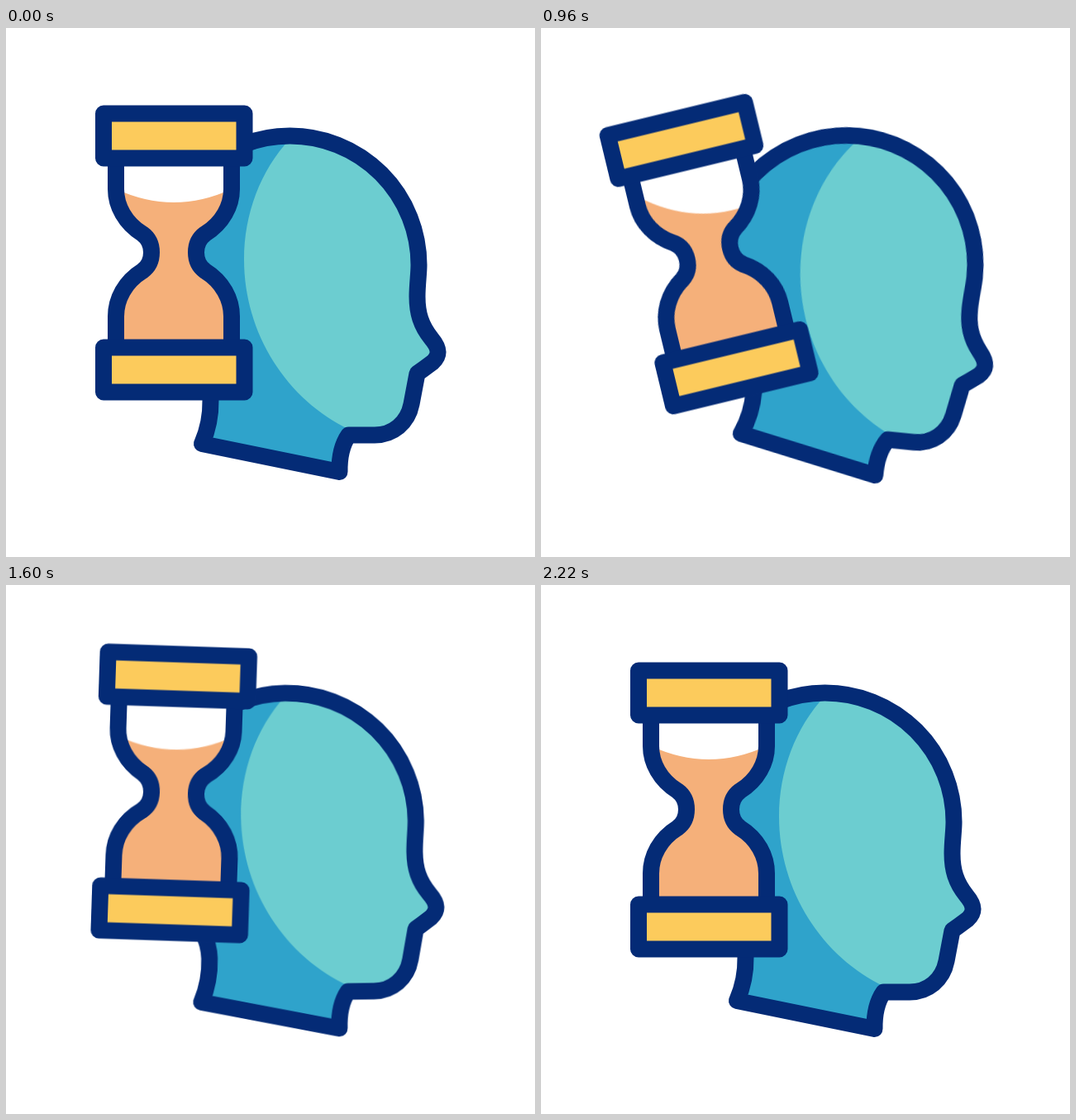
Recreate the animation shown at these times as an HTML page without scripts. Size 640 px wide and 640 px high, loop 2400 ms.

```html
<!DOCTYPE html>
<html lang="en">
<head>
<meta charset="utf-8">
<title>Head and hourglass</title>
<style>
  html, body { margin: 0; width: 100%; height: 100%; overflow: hidden; background: #fff; }
  svg { display: block; width: 100%; height: 100%; }

  .line { stroke: #042b76; stroke-width: 20; stroke-linejoin: round; }

  .nod, .lift, .tilt, .level {
    animation: 2400ms cubic-bezier(.3333, 0, .6667, 1) infinite;
  }
  .nod   { animation-name: nod;   transform-origin: 362px 546px; }
  .lift  { animation-name: lift; }
  .tilt  { animation-name: tilt;  transform-origin: 203px 272px; }
  .level { animation-name: level; transform-origin: 203px 211px; }

  @keyframes nod {
    0%, 8.333%    { transform: rotate(0deg); }
    33.333%       { transform: rotate(8.5deg); }
    58.333%       { transform: rotate(-7.2deg); }
    75%           { transform: rotate(5.5deg); }
    91.667%, 100% { transform: rotate(0deg); }
  }
  @keyframes lift {
    0%, 8.333%    { transform: translateY(0); }
    29.167%       { transform: translateY(-25px); }
    50%           { transform: translateY(25px); }
    70.833%       { transform: translateY(-25px); }
    91.667%, 100% { transform: translateY(0); }
  }
  @keyframes tilt {
    0%, 8.333%    { transform: rotate(0deg); }
    33.333%       { transform: rotate(-20deg); }
    58.333%       { transform: rotate(16deg); }
    75%           { transform: rotate(-12deg); }
    91.667%, 100% { transform: rotate(0deg); }
  }
  /* Cancels the tilt so the sand surface stays level. */
  @keyframes level {
    0%, 8.333%    { transform: translate(0, 0) rotate(0deg); }
    33.333%       { transform: translate(6px, 13px) rotate(20deg); }
    58.333%       { transform: translate(-3px, 5px) rotate(-16deg); }
    75%           { transform: translate(6px, 11px) rotate(12deg); }
    91.667%, 100% { transform: translate(0, 0) rotate(0deg); }
  }
</style>
</head>
<body>
<svg viewBox="0 0 640 640">
  <defs>
    <path id="head" d="M237 503Q248 478 247.5 450C247 400 187.5 350 187.5 286.5A156 156 0 0 1 499.5 286.5
      C499.5 298 497.5 310 497.5 325C497.5 345 502 360 514.5 375.5C525 388 525 396 516 404.5Q506 412 497.5 418
      L490.5 455C486 478 468 492.5 446 492.5H414.5Q403 509 403.5 537Z"/>
    <path id="glass" d="M133 157V195C133 215 144 236 165 249C172 254 176 262 176 271.5
      S172 289 165 294C144 307 133 328 133 349V387H273V349C273 328 262 307 241 294
      C234 289 230 281 230 271.5S234 254 241 249C262 236 273 215 273 195V157Z"/>
    <rect id="cap" x="118" width="170.5" height="54"/>
    <clipPath id="in-head"><use href="#head"/></clipPath>
    <clipPath id="in-glass"><use href="#glass"/></clipPath>
  </defs>

  <g class="nod">
    <use href="#head" fill="#2fa3cb"/>
    <path clip-path="url(#in-head)" fill="#6ccdd0"
      d="M343 135C308 172 288 225 288 280C288 370 340 450 416 486V560H560V100H343Z"/>
    <use href="#head" class="line" fill="none"/>
  </g>

  <g class="lift">
    <g class="tilt">
      <use href="#glass" fill="#fff"/>
      <g clip-path="url(#in-glass)">
        <path class="level" fill="#f5b07a" d="M63 146Q203 276 343 146V450H63Z"/>
      </g>
      <use href="#glass" class="line" fill="none"/>
      <g class="line" fill="#fccb5c">
        <use href="#cap" y="103.5"/>
        <use href="#cap" y="386.5"/>
      </g>
    </g>
  </g>
</svg>
</body>
</html>
```
